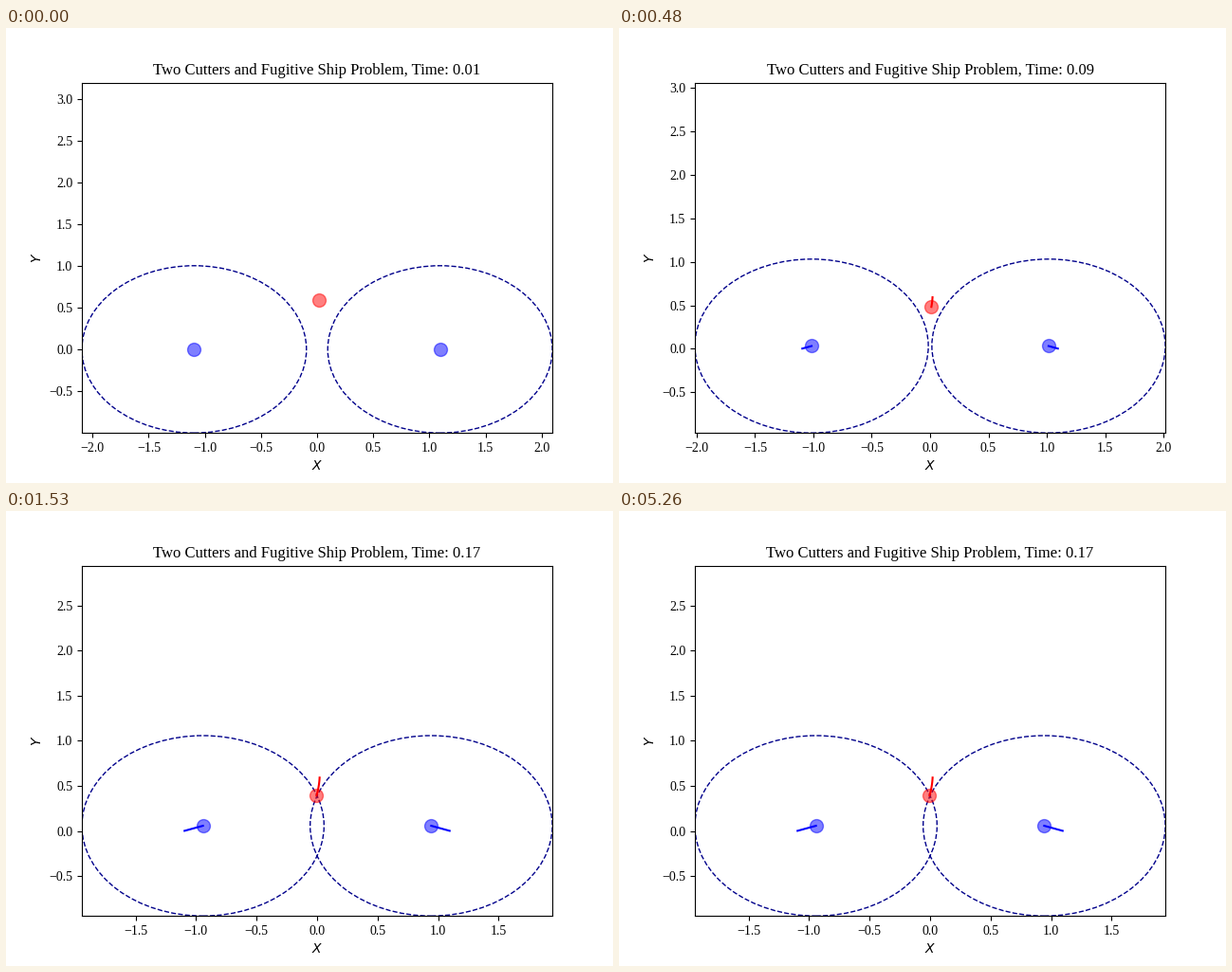
A matplotlib script that plays this animation: 640x480 px, repeating every 8000 ms.

```python
import numpy as np
import matplotlib.pyplot as plt
from matplotlib.animation import FuncAnimation
from matplotlib.patches import Circle

plt.rcParams["font.family"] = "Liberation Serif"

LOOP, INTERVAL, STEP = 8000, 25, 30   # ms
DT, T0, T_END, TAU = 0.0053, 0.0055, 0.1676, 4.0
CUTTER_V = np.array([0.9385, 0.345])
CUTTER_X, REACH = 1.1, 1.0
SHIP = np.array([0.021, 0.6])


def clock(n):
    """Simulation time: steady at first, then settling on the capture time."""
    n = np.asarray(n, dtype=float)
    join = (T_END - DT * TAU - T0) / DT
    late = T_END - DT * TAU * np.exp(-np.maximum(n - join, 0) / TAU)
    return np.where(n < join, T0 + DT * n, late)


def cutter(t, side):
    return side * (CUTTER_X - CUTTER_V[0] * t), CUTTER_V[1] * t


def ship(t):
    drop = 1.4 * t - 0.97 * t ** 2
    return SHIP[0] - 0.03 * drop - 0.45 * drop ** 2, SHIP[1] - drop


paths = [lambda t: cutter(t, -1), lambda t: cutter(t, 1), ship]
colors = ["b", "b", "r"]

fig, ax = plt.subplots(figsize=(6.4, 4.8), dpi=100)
ax.set_xlabel("$X$")
ax.set_ylabel("$Y$")
title = ax.set_title("")

circles = [
    ax.add_patch(Circle((0, 0), REACH, fill=False, ls="--", lw=1, ec="darkblue"))
    for _ in range(2)
]
trails = [ax.plot([], [], c + "-", lw=1.5)[0] for c in colors]
dots = [ax.plot([], [], c + "o", ms=10, alpha=0.5)[0] for c in colors]


def update(i):
    n = (i * INTERVAL + 15) // STEP
    times = clock(np.arange(min(n, 70) + 1))
    t = times[-1]
    for path, trail, dot in zip(paths, trails, dots):
        x, y = path(times)
        trail.set_data(x, y)
        dot.set_data(x[-1:], y[-1:])
    for circle, side in zip(circles, (-1, 1)):
        circle.center = cutter(t, side)
    cx, cy = cutter(t, 1)
    half = cx + REACH
    ax.set_xlim(-half, half)
    ax.set_ylim(cy - REACH, cy - REACH + 2 * half)
    title.set_text(f"Two Cutters and Fugitive Ship Problem, Time: {t:.2f}")
    return [*circles, *trails, *dots, title]


anim = FuncAnimation(fig, update, frames=LOOP // INTERVAL, interval=INTERVAL,
                     repeat=True, repeat_delay=0, blit=False)
plt.show()
```
